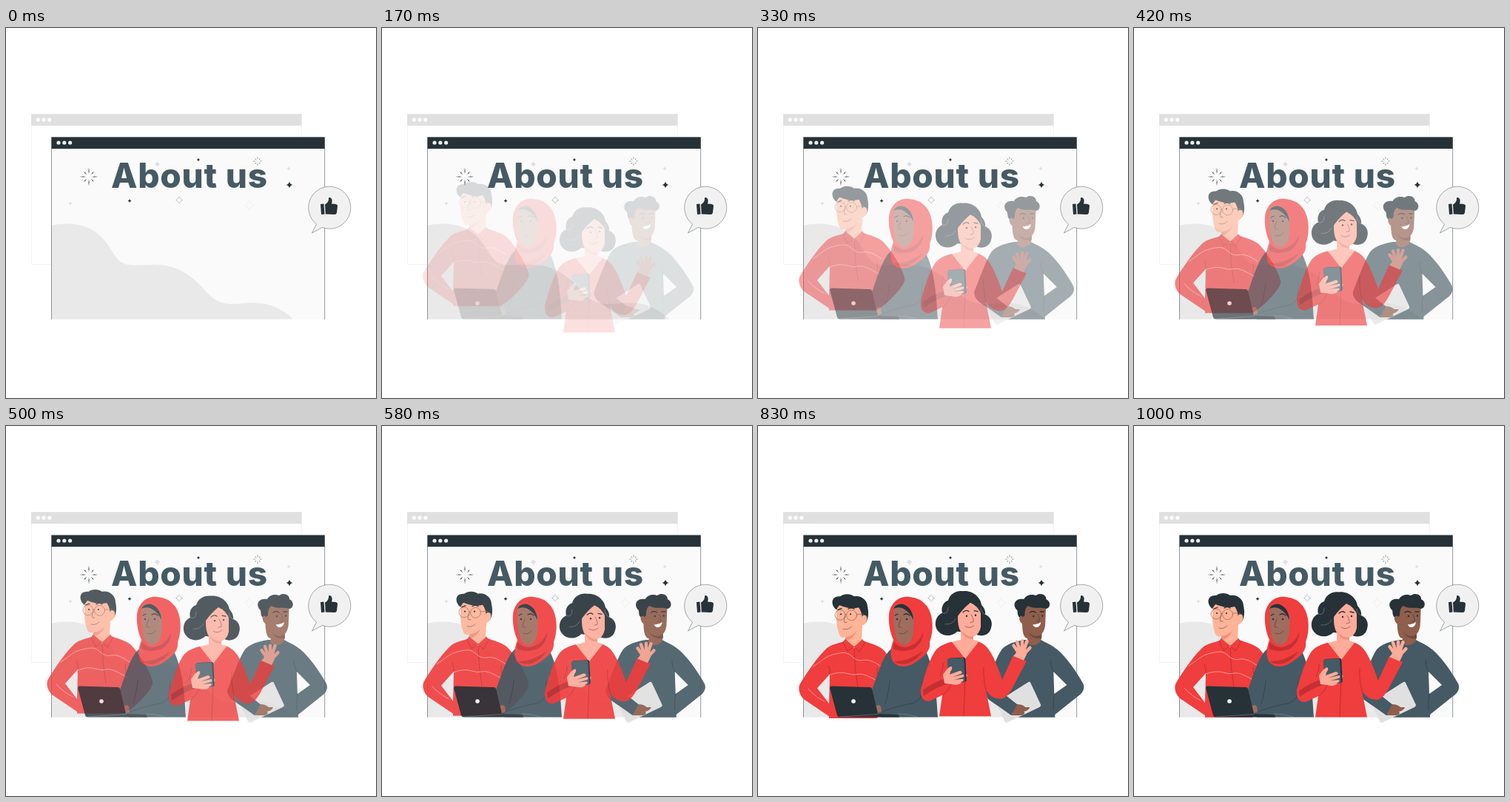
Animation, 500 px wide and 500 px high, one loop 1.04 s. Source, as an HTML page:

```html
<!DOCTYPE html>
<html lang="en">
<head>
<meta charset="utf-8">
<title>About us</title>
<style>
  html, body { margin: 0; width: 100%; height: 100%; overflow: hidden; background: #fff; }
  svg { display: block; width: 100%; height: 100%; }
  .title { font: 800 46px Inter, "Open Sans", sans-serif; letter-spacing: .8px; fill: #455a64; }
  .dark { fill: #263238; }
  .slate { fill: #455a64; }
  .red { fill: #f03d3d; }
  .deep { fill: #c43032; }
  .pale { fill: #ffb397; }
  .rosy { fill: #ffab99; }
  .brown { fill: #8f5e4c; }
  .tan { fill: #9e6d5d; }
  .grey { fill: #e0e0e0; }
  .line { fill: none; stroke: #263238; stroke-width: .8; stroke-linecap: round; stroke-linejoin: round; }
  .thin { stroke-width: .5; }
  .brow { stroke-width: 1.3; }
  .seam { stroke: #8f2326; }
  .light { stroke: #ffb5b1; stroke-width: .7; }
  .fold { stroke: #263238; }
  .shine { stroke: #899aa2; }
  .rim { stroke: #8d6657; stroke-width: .7; }
  .fingers { fill: none; stroke: #ffab99; stroke-width: 4.4; stroke-linecap: round; }
</style>
</head>
<body>
<svg viewBox="0 0 500 500">
  <!-- back window -->
  <rect x="34.3" y="116.3" width="365" height="203.4" fill="#fff" stroke="#e6e6e6" stroke-width=".5"/>
  <rect class="grey" x="34" y="116.300" width="365.500" height="15.700"/>
  <g fill="#fff"><circle cx="43.300" cy="124" r="2.600"/><circle cx="51" cy="124" r="2.600"/><circle cx="58.800" cy="124" r="2.600"/></g>

  <!-- front window -->
  <rect x="61.300" y="147.400" width="369.400" height="246.100" fill="#fafafa"/>
  <path fill="#e9e9e9" d="M61.500 267C72 264 85 264 95 265.500C118 269 131 282 142 299C150 313 155 320 172 320.500C185 321 195 318.500 212 320.500C240 324 258 342 270 356C280 367 290 373 305 373C320 373 330 370 345 372C362 374 376 382 388 393.500H61.500Z"/>
  <path class="line thin" d="M61.500 163V393.500M430.700 163V393.500"/>
  <rect class="dark" x="61.300" y="147.400" width="369.500" height="15.800"/>
  <g fill="#f0f0f0"><circle cx="71" cy="155" r="2.600"/><circle cx="78.800" cy="155" r="2.600"/><circle cx="86.600" cy="155" r="2.600"/></g>
  <g id="sparks"></g>
  <text class="title" x="248" y="216" text-anchor="middle">About us</text>

  <!-- man with glasses -->
  <g id="glasses">
    <path class="red" fill-rule="evenodd" d="M119 289C108 293 98 293 90 302C78 314 62 338 56 349C54 356 57 363 62 368L96 391V393.700H160C175 385 195 364 198 354C201 346 180 311 168 300C160 294 150 292 142 289L130 297ZM97 334L80 353L96 374Z"/>
    <path class="pale" d="M107 240C105 254 106 270 109 278C111 285 114 285 118 284L118 291Q122 299 130 299Q138 298 140 291L141 268C148 267 149 255 143 255L139 238Z"/>
    <path fill="#f08f7c" d="M118 284Q128 283 134 275Q128 288 118 289Z"/>
    <path class="red" d="M118 287L130 297L141 287L144 292L137 304L130 297L121 303L115 291Z"/>
    <path class="line thin seam" d="M118 287L115 291L121 303L130 297L137 304L144 292L141 287M130 297Q130 325 135 353M97 334Q98 329 95 322M160 352Q163 338 161 326"/>
    <path class="line light" d="M74 324Q82 319 88 314T103 307T117 305T128 311T143 315T167 324M68 354Q75 363 90 371M97 335Q111 330 120 333T136 334T164 345"/>
    <path class="dark" d="M106 247C98 241 98 228 111 229C116 225 125 225 130 229C139 227 148 234 148 243C150 252 149 259 146 264L141 263C141 253 139 248 136 244C126 247 116 243 110 241Q108 243 106 247Z"/>
    <path class="pale" d="M139 260Q141 252 146 255C149 259 146 267 141 268Z"/>
    <circle class="line rim" cx="111" cy="254" r="7"/><circle class="line rim" cx="126.500" cy="254.500" r="7"/>
    <path class="line rim" d="M118 253.500H119.500M133.500 253L143 253"/>
    <path class="line thin" d="M118 256Q115 262 117 264H120M115 273Q121 275 126 270"/>
    <path class="line brow" d="M108 247L113 245M122 246Q126 243 130 246"/>
    <circle class="dark" cx="112" cy="253" r="1.100"/><circle class="dark" cx="125" cy="253" r="1.100"/>
  </g>

  <!-- woman with headscarf and laptop -->
  <g id="scarf">
    <path class="slate" d="M182 300C171 306 164 328 153 360L160 386L166 393.500H243C241 366 240 328 225 301Z"/>
    <path class="line thin fold" d="M222 345L221 362Q220 371 208 375Q190 378 168 386M172 375Q177 358 178 344"/>
    <path class="line thin shine" d="M190 389Q202 389 215 393"/>
    <path class="red" d="M205 231C190 229 179 239 177 255C176 268 179 280 183 289C180 298 177 307 182 318C190 328 204 326 213 319C223 313 234 304 232 292C238 276 237 255 228 243Q219 232 205 231Z"/>
    <path class="deep" d="M184 292Q195 305 212 294Q219 289 224 278Q222 294 211 301Q194 307 183 301Q182 297 184 292ZM183 318Q202 319 223 304Q214 317 202 321Q191 323 183 318Z"/>
    <path class="tan" d="M184 244C182 260 183 277 187 287Q192 297 200 296Q208 292 210 280L211 259Q207 247 196 241Q188 239 184 244Z"/>
    <path class="dark" d="M183 247Q186 240 195 240.500Q209 245 210 262Q205 251 195 246Q188 244 183 247Z"/>
    <path class="line thin" d="M193 261Q190 268 190 271Q191 273 194 272M191 280Q197 283 202 277"/>
    <path class="line brow" d="M185 256L189 254M197 255Q201 252 205 256"/>
    <circle class="dark" cx="188" cy="261" r="1.200"/><circle class="dark" cx="201" cy="261" r="1.200"/>
    <path class="tan" d="M159 379Q163 375 166 379L167 386L162 388Z"/>
    <path class="dark" d="M99 351.500L151 353Q153 353 154 355L162 389L188 390Q191 391 191 393.500H111Q108 393.500 107 391L97 354Q97 352 99 351.500Z"/>
    <path class="line thin shine" d="M162 389.500L111 393"/>
    <circle cx="129" cy="372" r="2.800" fill="#fff"/>
  </g>

  <!-- man with papers -->
  <g id="papers">
    <path class="slate" fill-rule="evenodd" d="M359 289C347 291 335 294 328 302C320 314 311 340 305 355C303 362 308 368 314 372L340 390L347 393.700H400V390L430 366C438 361 441 354 438 348C428 330 415 312 403 302C396 296 388 293 381 289ZM398 332L416 350L399 362Z"/>
    <path class="brown" d="M357 238C355 260 355 275 358 283Q360 287 363 287L362 292Q370 301 381 291L382 281Q387 276 387 264L388 238Z"/>
    <path fill="#73483b" d="M364 279Q374 288 382 281V287Q370 289 364 279Z"/>
    <path class="dark" d="M355 260C348 258 350 251 349 249C341 241 347 232 358 234C363 226 371 228 374 229C381 224 389 229 388 234C395 237 394 246 388 247C380 244 371 248 364 243Q359 245 359 256Z"/>
    <path class="brown" d="M360 264Q356 253 352 258C351 264 355 268 359 268Z"/>
    <path class="line thin" d="M377 255Q380 261 379 264H375"/>
    <path class="line brow" d="M366 252Q370 249 374 252M380 251L385 251"/>
    <circle class="dark" cx="371" cy="257" r="1.200"/><circle class="dark" cx="383" cy="256.500" r="1.200"/>
    <path fill="#fff" d="M370 268Q376 269 381 265Q380 272 375 272Q371 272 370 268Z"/>
    <path class="grey" d="M364 346Q366 345 367 347L381 377Q381 379 379 380L335 401Q333 401 332 399L320 374Z"/>
    <path class="slate" d="M305 355C303 362 308 368 314 372L341 391L350 377L321 354Z"/>
    <path class="brown" d="M349 376Q356 376 360 380L366 380Q365 384 358 386Q361 389 355 391L341 391Z"/>
    <path class="line thin fold" d="M398 332Q394 324 394 317M399 362Q397 373 398 384"/>
  </g>

  <!-- woman with phone -->
  <g id="phone">
    <path class="dark" d="M277 224.500C267 223 259 229 257 237C250 239 247 247 249 254C239 258 237 272 244 279C251 287 264 285 269 279L292 281C301 288 313 284 315 274C318 265 313 258 307 256C308 250 304 245 302 243C301 233 290 223 277 224.500Z"/>
    <path class="rosy" d="M271 249C269 261 270 273 274 279L274 290L259 294L280 317L301 293L291 290L291 286Q299 283 301 273L301 252Q295 240 286 237Q278 240 271 249Z"/>
    <path fill="#f08f7c" d="M274 277Q281 286 291 286L291 289Q279 290 274 277Z"/>
    <path class="dark" d="M270 258Q267 243 279 235Q296 231 302 256Q297 244 287 240Q278 247 270 258Z"/>
    <path class="line thin" d="M288 256Q292 263 291 266L287 267M280 272Q286 276 292 271"/>
    <path class="line brow" d="M277 253Q281 249 285 252M292 251L297 252"/>
    <circle class="dark" cx="282" cy="258" r="1.200"/><circle class="dark" cx="294" cy="257" r="1.200"/>
    <path class="line thin shine" d="M249 254Q257 257 257 246M253 269Q263 270 267 262M307 256Q302 254 301 247"/>
    <path class="red" d="M262 293C252 295 244 299 239 306C230 320 224 342 220 357C219 368 224 374 232 373L249 365L245 393.500H315L308 358Q316 371 329 370C336 368 340 362 344 355L363 319L345 311L330 344C325 329 318 311 310 301Q305 295 298 293L280 316Z"/>
    <path class="deep" d="M223 358Q238 347 252 343L255 350Q241 354 224 366Z"/>
    <path class="line thin seam" d="M280 316Q280 355 278 393M250 365Q258 358 261 351M308 358Q304 341 305 327M246 339Q251 329 250 322"/>
    <path class="rosy" d="M252 349L250 338L258 326L268 325L282 337Q284 339 280 341L281 344Q280 347 276 347Q271 353 261 350Z"/>
    <rect class="dark" x="258" y="314.500" width="23" height="33" rx="2" transform="rotate(-3 268 331)"/>
    <rect class="slate" x="256.500" y="315" width="22.500" height="33" rx="2" transform="rotate(-3 268 331)"/>
    <path class="rosy" d="M250 337Q257 327 261 326Q264 328 260 333L259 337L273 332Q277 333 275 336L265 340L277 337Q280 338 277 341L267 344L277 343Q279 345 275 347Q267 352 254 348Z"/>
    <path class="line thin" stroke-opacity=".5" d="M264 340L275 336M266 344L277 341"/>
    <path class="rosy" d="M345 312Q350 308 350 302L362 301L363 310L359 318Z"/>
    <path class="fingers" d="M353 309L345.500 298M354 305L350 293M357 304V291.500M359 305L363.500 292M359 310L367.500 301"/>
  </g>

  <!-- speech bubble -->
  <path fill="#f1f1f1" stroke="#263238" stroke-width=".4" d="M419.500 265L413.500 277L427.500 269.500A28.500 28.500 0 1 0 419.500 265Z"/>
  <path class="dark" d="M425 238L429.500 237.500L430.500 251.500L426 252ZM431 238.500C434 237 436.500 234 436 229.500Q439 228 440.500 232Q441 235 440 237.500L446 238Q448.500 239 448 241L447 249.500Q446.500 252 444 252L431.800 251.500Z"/>
</svg>
<script>
  const LOOP = 1040, FPS = 24, SHIFT = 20;
  const find = id => document.getElementById(id);
  const polar = (r, a) => `${(r * Math.cos(a)).toFixed(2)} ${(r * Math.sin(a)).toFixed(2)}`;

  // eight thin tapered rays around an empty centre
  function burst(r) {
    let d = "";
    for (let i = 0; i < 8; i++) {
      const a = i * Math.PI / 4, end = i % 2 ? r * .75 : r;
      d += `M${polar(r * .32, a)}L${polar(r * .6, a + .07)}L${polar(end, a)}L${polar(r * .6, a - .07)}Z`;
    }
    return d;
  }

  const star = r => `M0 ${-r}Q${r * .2} ${-r * .2} ${r} 0Q${r * .2} ${r * .2} 0 ${r}Q${-r * .2} ${r * .2} ${-r} 0Q${-r * .2} ${-r * .2} 0 ${-r}Z`;

  const sparks = [
    [burst, 112, 201, 12.5, "dark"], [burst, 340, 180, 7, "dark"],
    [burst, 234, 232.5, 5.5, "dark"], [burst, 328.5, 239.5, 7.5, "grey"],
    [star, 383, 212, 4.5, "dark"], [star, 260, 178, 2.3, "dark"],
    [star, 167, 233.5, 2.5, "dark"], [star, 204.5, 184, 4.5, "grey"],
    [star, 382, 190, 2.7, "grey"], [star, 87, 237, 2.7, "grey"]
  ];
  find("sparks").innerHTML = sparks.map(([shape, x, y, r, tone]) =>
    `<path class="${tone}" transform="translate(${x} ${y})" d="${shape(r)}"/>`).join("");

  const bezier = (a, b, s) => 3 * a * s * (1 - s) ** 2 + 3 * b * s * s * (1 - s) + s ** 3;

  // cubic-bezier(.36, -.01, .5, 1.38): ends with a slight overshoot
  function ease(x) {
    let lo = 0, hi = 1;
    for (let i = 0; i < 24; i++) {
      const mid = (lo + hi) / 2;
      if (bezier(.36, .5, mid) < x) lo = mid; else hi = mid;
    }
    return bezier(-.01, 1.38, hi);
  }

  // start direction of each person
  const people = [["glasses", 0, -1], ["scarf", 0, 0], ["papers", -1, 0], ["phone", 0, 1]]
    .map(([id, dx, dy]) => ({ node: find(id), dx, dy }));

  function draw(now) {
    const step = Math.floor((now % LOOP) * FPS / 1000 + .12);
    const p = step < 2 ? 0 : step >= FPS ? 1 : ease(step / FPS);
    const away = SHIFT * (1 - p);
    const alpha = Math.min(1, p ** .8);
    for (const { node, dx, dy } of people) {
      node.setAttribute("transform", `translate(${dx * away} ${dy * away})`);
      node.setAttribute("opacity", alpha);
    }
  }

  const start = performance.now();
  function tick() {
    draw(performance.now() - start);
    requestAnimationFrame(tick);
  }
  tick();
</script>
</body>
</html>
```
